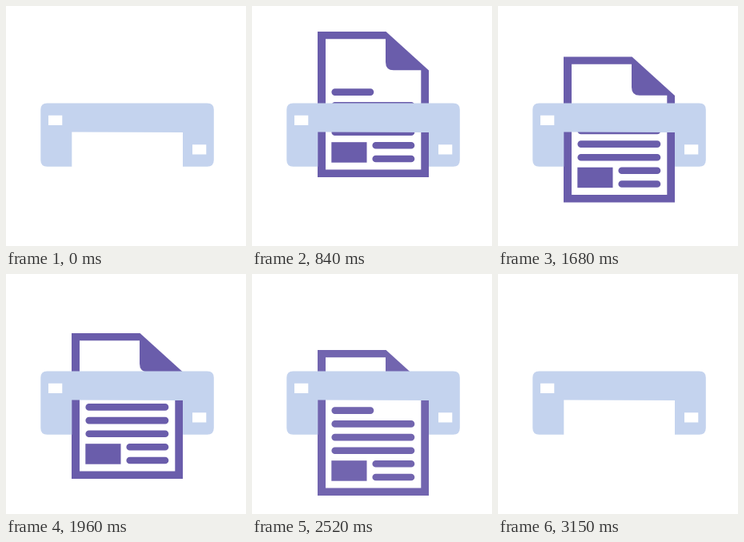
These frames come from a looping animation (300x300 px, 3.29 s). An HTML page:

```html
<!DOCTYPE html>
<html lang="en">
<head>
<meta charset="utf-8">
<title>Printer</title>
<style>
  html, body { margin: 0; width: 100%; height: 100%; overflow: hidden; background: #fff; }
  svg { display: block; width: 100%; height: 100%; }
</style>
</head>
<body>
<svg viewBox="0 0 300 300">
  <g id="paper" fill="#6a5dab" opacity="0">
    <path d="M82 0H167.5L221 48.5V182H82Z"/>
    <path fill="#fff" d="M92 9.3H167V38Q167 48.3 177 48.3H211.3V172.6H92Z"/>
    <path stroke="#6a5dab" stroke-width="8.6" stroke-linecap="round"
      d="M103.7 75.7H148M103.7 92.5H199M103.7 109.2H199M103.7 125.8H199M154.7 142.4H199M154.7 159.1H199"/>
    <rect x="99.3" y="138.3" width="44.2" height="25.5"/>
  </g>
  <path fill="#c4d3ee" d="M51.5 121.5H251.5Q259.8 121.5 259.8 129.5V192.5Q259.8 200.7 251.5 200.7H221V158L82.3 157.5V200.7H51.5Q43.3 200.7 43.3 192.5V129.5Q43.3 121.5 51.5 121.5Z"/>
  <path fill="#fff" d="M53 136.7h17.3v12.3h-17.3zM233 173.2h17.3v12.3h-17.3z"/>
</svg>
<script>
  const LOOP = 3290, STEP = 70, LAST = 3150, FADE = 735;
  const paper = document.getElementById('paper');

  const smooth = x => {
    x = Math.max(0, Math.min(1, x));
    return x * x * (3 - 2 * x);
  };

  function draw(now) {
    const t = Math.min(LAST, Math.floor(now % LOOP / STEP) * STEP);
    paper.setAttribute('transform', `translate(0 ${0.4 + 0.0375 * t})`);
    paper.setAttribute('opacity', smooth(t / FADE) * smooth((LAST - t) / FADE));
    requestAnimationFrame(draw);
  }
  requestAnimationFrame(draw);
</script>
</body>
</html>
```
